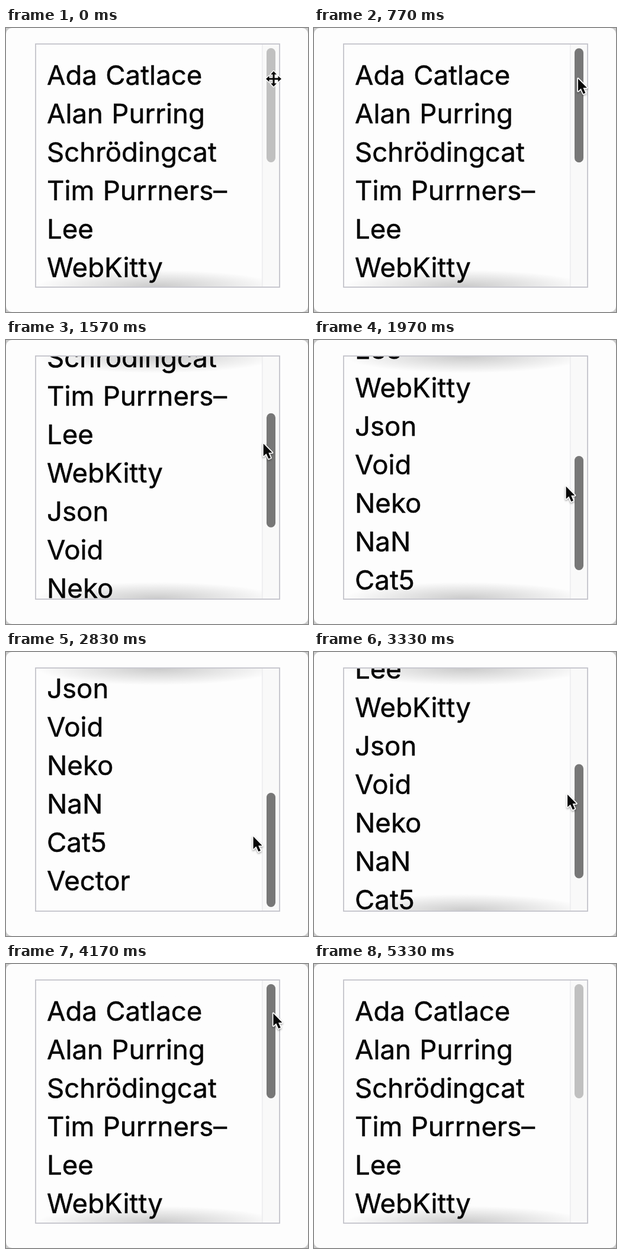
An HTML page for the animation above (5.36 s loop, 510 by 480 pixels).

```html
<!DOCTYPE html>
<html lang="en">
<head>
<meta charset="utf-8">
<title>Scroll shadows</title>
<style>
  html, body { margin: 0; width: 100%; height: 100%; overflow: hidden; background: #cbcbcb; }
  svg { display: block; width: 510px; height: 480px; }
  text { font: 400 45.6px Inter, "Open Sans", sans-serif; word-spacing: 1.5px; fill: #050505; stroke: #050505; stroke-width: .5; }
</style>
</head>
<body>
<svg viewBox="0 0 510 480">
  <defs>
    <clipPath id="view"><rect x="51" y="28" width="410" height="409"/></clipPath>
    <radialGradient id="shade">
      <stop offset="0" stop-opacity=".2"/>
      <stop offset="1" stop-opacity="0"/>
    </radialGradient>
    <linearGradient id="coverTop" x2="0" y2="1">
      <stop offset=".3" stop-color="#fdfdfd"/>
      <stop offset="1" stop-color="#fdfdfd" stop-opacity="0"/>
    </linearGradient>
    <linearGradient id="coverBottom" y1="1" x2="0" y2="0">
      <stop offset=".3" stop-color="#fdfdfd"/>
      <stop offset="1" stop-color="#fdfdfd" stop-opacity="0"/>
    </linearGradient>
  </defs>

  <rect width="510" height="480" rx="10" fill="#fdfdfd"/>
  <g clip-path="url(#view)">
    <ellipse cx="256" cy="28" rx="205" ry="28" fill="url(#shade)"/>
    <ellipse cx="256" cy="437" rx="205" ry="28" fill="url(#shade)"/>
    <g id="content">
      <rect x="51" y="28" width="410" height="80" fill="url(#coverTop)"/>
      <rect x="51" y="766" width="410" height="80" fill="url(#coverBottom)"/>
    </g>
    <rect x="432" y="28" width="30" height="410" fill="#f9f9f9"/>
    <rect x="432" y="28" width="1.5" height="410" fill="#ececee"/>
  </g>
  <rect x="50" y="27" width="412" height="411" fill="none" stroke="#c3c3ca" stroke-width="1.8"/>
  <rect id="thumb" x="440" width="15" height="193" rx="7.5"/>

  <g id="pointer" stroke="#fdfdfd" stroke-linejoin="round" paint-order="stroke" fill="#080808">
    <path id="arrow" stroke-width="4" transform="scale(.88)" style="filter: drop-shadow(0 2px 2px #0005)"
      d="M0 1V25L5.500 20L10 30L14 28.300L9.700 18.500H17Z"/>
    <path id="move" stroke-width="3"
      d="M0-13L5-7.500H1.600V-1.600H7.500V-5L13 0L7.500 5V1.600H1.600V7.500H5L0 13L-5 7.500H-1.600V1.600H-7.500V5L-13 0L-7.500-5V-1.600H-1.600V-7.500H-5Z"/>
  </g>
</svg>
<script>
const LOOP = 5360, GRAB_Y = 84.5, TRAVEL = 204;
const ARROW_AT = 100, GRAB_AT = 350, RELEASE_AT = 4480;
const names = ["Ada Catlace", "Alan Purring", "Schrödingcat", "Tim Purrners–", "Lee", "WebKitty",
  "Json", "Void", "Neko", "NaN", "Cat5", "Vector"];

// Pointer stops: time, x, y. Each leg eases in and out.
const stops = [
  [0, 452, 86], [350, 452, 84.5], [730, 446, 84.5], [2690, 417, 315],
  [4400, 453, 72], [4900, 464, -40], [LOOP, 464, -40]
];

const $ = id => document.getElementById(id);
const clamp = (v, lo, hi) => Math.min(hi, Math.max(lo, v));

names.forEach((name, i) => {
  const line = document.createElementNS("http://www.w3.org/2000/svg", "text");
  line.setAttribute("x", 69);
  line.setAttribute("y", 96 + i * 65);
  line.textContent = name;
  $("content").append(line);
});

function pointerAt(t) {
  const next = stops.findIndex(stop => t < stop[0]);
  const [t0, x0, y0] = stops[next - 1], [t1, x1, y1] = stops[next];
  const k = (1 - Math.cos(Math.PI * (t - t0) / (t1 - t0))) / 2;
  return [x0 + (x1 - x0) * k, y0 + (y1 - y0) * k];
}

function draw(t) {
  const [x, y] = pointerAt(t);
  const dragging = t >= GRAB_AT && t < RELEASE_AT;
  const offset = dragging ? clamp(y - GRAB_Y, 0, TRAVEL) : 0;
  $("content").setAttribute("transform", `translate(0 ${-2 * offset})`);
  $("thumb").setAttribute("y", 34 + offset);
  $("thumb").setAttribute("fill", dragging ? "#777" : "#c0c0c0");
  $("pointer").setAttribute("transform", `translate(${x} ${y})`);
  $("arrow").style.display = t < ARROW_AT ? "none" : "";
  $("move").style.display = t < ARROW_AT ? "" : "none";
}

const start = performance.now();
function tick() {
  draw((performance.now() - start) % LOOP);
  requestAnimationFrame(tick);
}
tick();
</script>
</body>
</html>
```
